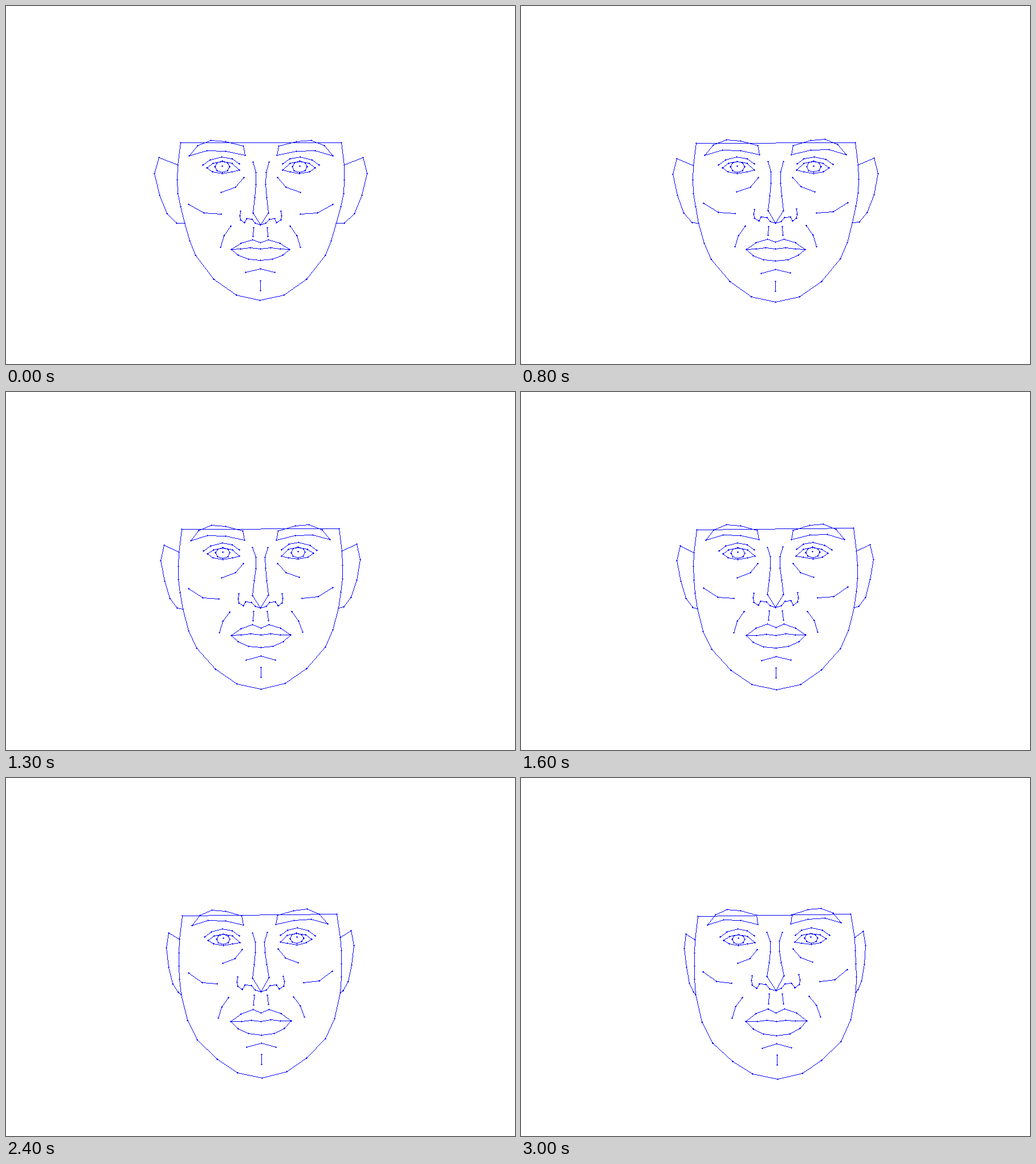
Animation of 893x627 px, one loop 3100 ms. Source, as an HTML page with a canvas:

```html
<!DOCTYPE html>
<html lang="en">
<head>
<meta charset="utf-8">
<title>Face outline morph</title>
<style>
html, body { margin: 0; width: 100%; height: 100%; overflow: hidden; background: #fff; }
canvas { display: block; }
</style>
</head>
<body>
<canvas id="stage" width="893" height="627"></canvas>
<script>
const LOOP = 3100, STEP = 100, LAST = 29;
const AXIS = 446;            // points with this x stay on the axis of the face
const ctx = document.getElementById('stage').getContext('2d');
const parts = [];
const welds = new Map();     // shared vertices keep the drift of the part that came first

const toPairs = list => Array.from({ length: list.length / 2 }, (_, i) => [list[2 * i], list[2 * i + 1]]);

// A left-half polyline; drift(point, index) gives its total travel.
function add(points, drift, closed) {
  const vertices = points.map((p, i) => {
    const key = p.join();
    if (!welds.has(key)) welds.set(key, drift(p, i));
    return [...p, ...welds.get(key)];
  });
  parts.push({ vertices, closed });
}

// Moves a feature by (dx, dy) while scaling it about its own centre.
function feature(points, dx, dy, sx = 1, sy = 1, closed = false) {
  const middle = k => {
    const v = points.map(p => p[k]);
    return (Math.min(...v) + Math.max(...v)) / 2;
  };
  const cx = middle(0), cy = middle(1);
  add(points, ([x, y]) => [dx + (sx - 1) * (x - cx), dy + (sy - 1) * (y - cy)], closed);
}

function octagon(cx, cy, rx, ry) {
  return Array.from({ length: 8 }, (_, i) => {
    const a = i * Math.PI / 4;
    return [cx + rx * Math.cos(a), cy + ry * Math.sin(a)];
  });
}

// Head outline, from temple to chin
const head = toPairs([306,239, 301,278, 300,304, 301,328, 306,351, 313,380,
  322,411, 332,436, 364,478, 404,506, 446,515]);
const longHead = toPairs([310,242, 305,283, 304,306, 304,329, 304,352, 306,379,
  317,427, 336,464, 371,496, 406,518, 446,527]);
add(head, ([x, y], i) => [longHead[i][0] - x, longHead[i][1] - y]);

// Ear
feature(toPairs([301,278, 268,265, 260,293, 269,331, 282,363, 299,380, 313,380]), 10.6, 1, .42, .88);
// Brow
feature(toPairs([321,262, 336,244, 359,235, 385,237, 416,245, 419,261, 385,254, 352,253]), 1.3, -5, .9, 1, true);
// Eyelid, eye, iris, pupil
feature(toPairs([345,278, 358,269, 378,264, 396,267, 409,276]), 1.6, 0, .94);
feature(toPairs([352,283, 363,275, 379,272, 396,275, 409,287, 396,290, 379,293, 362,290]), 2, 1, .965, .93, true);
feature(octagon(379, 281, 13, 10), 2, 1, .88, .85, true);
feature([[379, 280]], 2, 0);
// Under-eye line, cheek, smile line
feature(toPairs([417,300, 402,317, 377,326]), 0, -1, .83, .9);
feature(toPairs([320,347, 347,362, 377,364]), -4.5, -6.5, .86, 1.15);
feature(toPairs([394,385, 382,402, 376,422]), -5.6, -1.6, 1, .97);
// Nostril, nose bridge, philtrum
feature(toPairs([411,359, 410,367, 411,374, 418,379, 422,372, 431,373, 437,380, 446,383]), -2.5, -12.3, 1.22, 1.1);
feature(toPairs([433,273, 438,291, 438,312, 436,335, 433,362, 446,383]), -1, -10.6, 1.1, .86);
feature(toPairs([434,388, 433,403]), 1, -9, 1, 1.13);
// Lips and the line between them
feature(toPairs([446,414, 432,409, 412,415, 395,426, 407,436, 425,443, 446,445]), .3, .5, 1.04, 1.3);
feature(toPairs([395,426, 411,425, 428,423, 446,425]), 3, 1);
// Chin
feature(toPairs([420,466, 446,460]), 3, 6, 1, 1.3);
feature(toPairs([446,481, 446,498]), 0, 3.5);

// Twice the x of the axis, which tilts as the face grows longer
const axisSum = (y, u) => 892.8 - .6 * u + (.052 * u - .012) * (y - 350);

function pose([x, y, dx, dy], u) {
  const py = y + dy * u;
  return [x === AXIS ? axisSum(py, u) / 2 : x + dx * u, py];
}

function mirror([x, y], u) {
  const rx = axisSum(y, u) - x;
  return [rx, y - .015 * u * (rx - x)];
}

// One-pixel line without smoothing
function line(a, b) {
  const [x0, y0] = a.map(Math.round), [x1, y1] = b.map(Math.round);
  const n = Math.max(Math.abs(x1 - x0), Math.abs(y1 - y0), 1);
  for (let i = 0; i <= n; i++) {
    ctx.fillRect(Math.round(x0 + (x1 - x0) * i / n), Math.round(y0 + (y1 - y0) * i / n), 1, 1);
  }
}

function dot(p) {
  const [x, y] = p.map(Math.round);
  ctx.fillRect(x - 1, y, 3, 1);
  ctx.fillRect(x, y - 1, 1, 3);
}

function polyline(points, closed) {
  points.forEach((p, i) => {
    dot(p);
    if (i) line(points[i - 1], p);
  });
  if (closed) line(points[points.length - 1], points[0]);
}

function draw(step) {
  const u = step / LAST;
  ctx.fillStyle = '#fff';
  ctx.fillRect(0, 0, 893, 627);
  ctx.fillStyle = '#00f';
  parts.forEach(({ vertices, closed }, i) => {
    const left = vertices.map(v => pose(v, u));
    const right = left.map(p => mirror(p, u));
    polyline(left, closed);
    polyline(right, closed);
    if (i === 0) line(left[0], right[0]);   // forehead
  });
}

let shown = -1;
const start = performance.now();
function tick() {
  const t = (performance.now() - start) % LOOP;
  const step = Math.max(0, Math.floor(t / STEP) - 1);
  if (step !== shown) draw(shown = step);
  requestAnimationFrame(tick);
}
tick();
</script>
</body>
</html>
```
